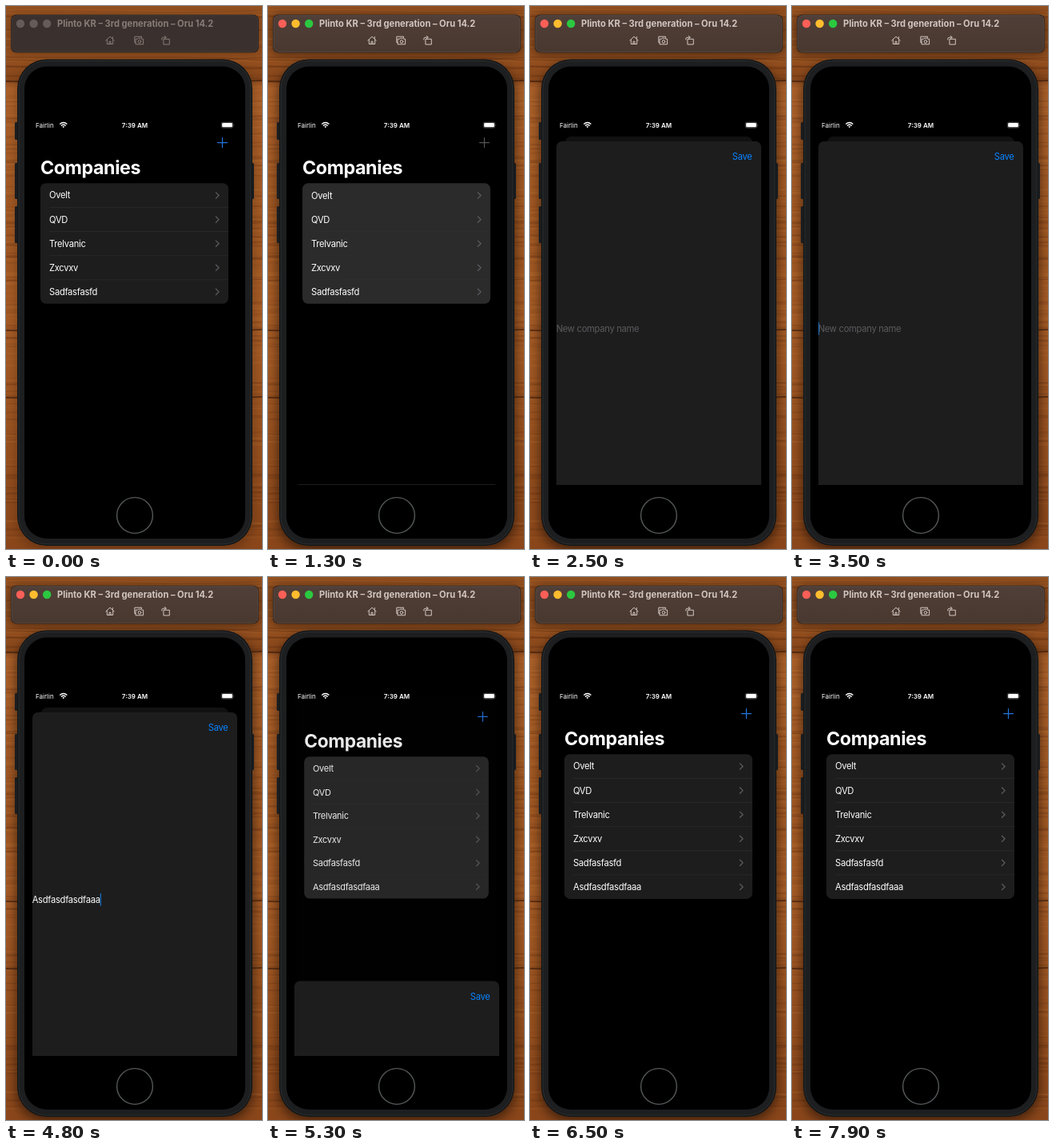
An HTML page for the animation above (8 s loop, 320 by 678 pixels).

```html
<!DOCTYPE html>
<html lang="en">
<head>
<meta charset="utf-8">
<title>Company list</title>
<style>
html, body { margin: 0; width: 100%; height: 100%; overflow: hidden; background: #6f3b19; }
svg { display: block; width: 320px; height: 678px; }
text { font-family: Inter, "Open Sans", sans-serif; fill: #fff; white-space: pre; }
.body { font-size: 11.2px; letter-spacing: -.29px; }
.status { font-size: 8px; }
.line { fill: none; stroke-linecap: round; stroke-linejoin: round; }
</style>
</head>
<body>
<svg viewBox="0 0 320 678">
  <defs>
    <linearGradient id="wood" x2="0" y2="1">
      <stop offset="0" stop-color="#94501f"/>
      <stop offset=".1" stop-color="#95501f"/>
      <stop offset=".135" stop-color="#85451a"/>
      <stop offset=".15" stop-color="#ac6029"/>
      <stop offset=".4" stop-color="#a05722"/>
      <stop offset=".6" stop-color="#a65b25"/>
      <stop offset=".8" stop-color="#98511f"/>
      <stop offset="1" stop-color="#8a461a"/>
    </linearGradient>
    <linearGradient id="bar" x2="0" y2="1">
      <stop offset="0" stop-color="#503f38"/>
      <stop offset="1" stop-color="#48382f"/>
    </linearGradient>
    <filter id="blur" x="-20%" y="-40%" width="140%" height="180%"><feGaussianBlur stdDeviation="7"/></filter>
    <clipPath id="screen"><rect x="33" y="143" width="256" height="455"/></clipPath>
  </defs>

  <rect width="320" height="678" fill="url(#wood)"/>
  <g id="grain" class="line"></g>
  <g id="shadow" filter="url(#blur)">
    <rect x="12" y="72" width="298" height="608" rx="38"/>
    <rect x="5" y="12" width="312" height="48" rx="8"/>
  </g>

  <!-- phone -->
  <g fill="#1b1d1f">
    <rect x="11" y="145" width="5" height="22" rx="1.5"/>
    <rect x="11" y="196" width="5" height="45" rx="1.5"/>
    <rect x="11" y="250" width="5" height="46" rx="1.5"/>
    <rect x="306" y="196" width="4" height="45" rx="1.5"/>
  </g>
  <rect x="14" y="66.5" width="294" height="607.5" rx="37" fill="#141617"/>
  <rect x="16" y="68.5" width="290" height="603.5" rx="35" fill="#1c1e20" stroke="#2b2e30"/>
  <rect x="23" y="75.5" width="276" height="589.5" rx="28"/>
  <circle cx="161" cy="636" r="22.4" fill="none" stroke="#55585a" stroke-width="1.4"/>

  <!-- simulator title bar -->
  <rect x="6" y="10.8" width="310" height="47.4" rx="7" fill="#17110e"/>
  <rect id="barFace" x="6.9" y="11.7" width="308.2" height="45.6" rx="6.2" stroke-width=".7"/>
  <g id="lights"></g>
  <text id="barTitle" x="64" y="26" font-size="11.1" font-weight="700">Plinto KR – 3rd generation – Oru 14.2</text>
  <g id="tools" class="line" stroke-width="1">
    <path d="M124.8 43 130 38.2 135.2 43M126.3 42.5V47.5H133.7V42.5M129 47.5V44.3H131V47.5M133.3 40.5V38.5"/>
    <path d="M162 45.5H160.8V38.2H169.5V39.8M162.4 41.2H164.6L165.4 40.2H168.6L169.4 41.2H171.6V47.8H162.4Z"/>
    <circle cx="167" cy="44.4" r="1.8"/>
    <path d="M197.3 41.3H204.3V48H197.3ZM194.8 42V41Q194.8 39.2 197 39.2H200M198.3 37.4 200.2 39.2 198.3 41"/>
  </g>

  <!-- app -->
  <g clip-path="url(#screen)">
    <g id="page">
      <rect id="card" x="33" y="143" width="256" height="455" rx="8"/>
      <path id="plus" class="line" d="M264.5 170.5H276.5M270.5 164.5V176.5" stroke-width="1.25"/>
      <text x="43" y="210.3" font-size="23.2" font-weight="700" letter-spacing="-.35">Companies</text>
      <rect id="list" x="43" y="221.3" width="235" rx="7"/>
      <g id="rows"></g>
      <rect id="dim" x="32" y="142" width="258" height="457"/>
    </g>
    <g id="sheet">
      <rect x="33" width="256" height="470" rx="7" fill="#1d1d1e"/>
      <text id="save" class="body" x="252.8" y="23.4" style="fill:#0a84ff">Save</text>
      <g id="field">
        <text id="entry" class="body" x="32.7"></text>
        <rect id="caret" y="-12" width="1.3" height="15.5" fill="#1b70c4"/>
      </g>
    </g>
  </g>

  <!-- status bar -->
  <text class="status" x="37" y="151.7">Fairlin</text>
  <text class="status" x="161" y="151.7" font-weight="600" text-anchor="middle">7:39 AM</text>
  <g class="line" stroke="#fff" stroke-width="1.35" style="stroke-linecap:butt">
    <path d="M67.2 147.5Q71.8 143.6 76.4 147.5M68.9 149.4Q71.8 147 74.7 149.4"/>
    <path d="M70.4 150.6Q71.8 149.5 73.2 150.6L71.8 152.2Z" fill="#fff" stroke="none"/>
  </g>
  <rect x="269.2" y="145.2" width="14.6" height="6.9" rx="2" fill="none" stroke="#777" stroke-width=".6"/>
  <rect x="270.1" y="146" width="12.8" height="5.3" rx="1.3" fill="#fff"/>
  <path d="M284.6 147.5Q285.8 148.7 284.6 149.9Z" fill="#888"/>
</svg>

<script>
const LOOP = 8;
const OPEN_AT = 1.295, CLOSE_AT = 5.061;
const FOCUS_AT = 3, TYPE_AT = 3.85, TYPE_END = 4.6;
const ROW_HEIGHT = 30.1;
const TYPED = "Asdfasdfasdfaaa";
const companies = ["Ovelt", "QVD", "Trelvanic", "Zxcvxv", "Sadfasfasfd", TYPED];

const $ = id => document.getElementById(id);
const clamp = x => Math.min(1, Math.max(0, x));

function add(parent, tag, attrs, text = "") {
  const node = document.createElementNS("http://www.w3.org/2000/svg", tag);
  for (const key in attrs) node.setAttribute(key, attrs[key]);
  node.textContent = text;
  parent.append(node);
  return node;
}

function drawGrain() {
  let seed = 11;
  const random = () => (seed = seed * 16807 % 2147483647) / 2147483647;
  for (let i = 0; i < 180; i++) {
    const y = random() * 678, bend = () => y + random() * 10 - 5;
    add($("grain"), "path", {
      d: `M-5 ${y}C80 ${bend()} 220 ${bend()} 325 ${bend()}`,
      stroke: random() < .55 ? "#4a210a" : "#c47a39",
      "stroke-width": .5 + random() * 2.2,
      opacity: .06 + random() * .18
    });
  }
  for (const y of [94, 405, 489])
    add($("grain"), "path", { d: `M0 ${y}Q160 ${y + 4} 320 ${y - 1}`, stroke: "#2a1206", "stroke-width": 1.8, opacity: .55 });
}

const lights = [18, 34.6, 51.2].map(cx => add($("lights"), "circle", { cx, cy: 22, r: 5.2 }));

const rows = companies.map((name, i) => {
  const row = add($("rows"), "g", { transform: `translate(0 ${221.3 + i * ROW_HEIGHT})` });
  if (i) add(row, "path", { d: "M54 0H278", stroke: "#303032", "stroke-width": .6 });
  add(row, "text", { class: "body", x: 54, y: 19.2 }, name);
  add(row, "path", { class: "line", d: "M262.4 11.6 266.1 15.2 262.4 18.8", stroke: "#5c5c60", "stroke-width": 1.3 });
  return row;
});

// Critically damped spring from 0 to 1.
function spring(t) {
  const x = 12 * Math.max(0, t);
  return 1 - (1 + x) * Math.exp(-x);
}

// An active window has coloured controls and a heavier shadow.
function drawWindow(active) {
  const colors = active ? ["#fb5f57", "#febc2e", "#2bc840"] : Array(3).fill("#655b58");
  const ink = active ? "#d2c6c0" : "#887c77";
  lights.forEach((light, i) => light.setAttribute("fill", colors[i]));
  $("barTitle").style.fill = ink;
  $("tools").setAttribute("stroke", ink);
  $("barFace").setAttribute("fill", active ? "url(#bar)" : "#3a302d");
  $("barFace").setAttribute("stroke", active ? "#6b5b53" : "#534844");
  $("shadow").setAttribute("opacity", active ? .5 : .22);
}

function drawPage(p, closing) {
  const scale = 1 - .086 * p;
  const raised = p > .002;
  const count = closing ? 6 : 5;
  const level = 27 * p * p;
  $("page").setAttribute("transform", `translate(161 ${143 + 20 * p}) scale(${scale}) translate(-161 -143)`);
  $("card").setAttribute("fill", `rgb(${level},${level},${level})`);
  $("plus").setAttribute("stroke", raised && !closing ? "#545456" : "#2474dc");
  $("list").setAttribute("height", count * ROW_HEIGHT);
  $("list").setAttribute("fill", raised ? "#2b2b2c" : "#1d1d1e");
  rows[5].setAttribute("visibility", closing ? "visible" : "hidden");
  $("dim").setAttribute("opacity", .39 * p);
}

function drawSheet(p, t) {
  $("sheet").setAttribute("transform", `translate(0 ${598 - 429 * p})`);
  $("field").setAttribute("transform", `translate(0 ${238 + 24 * (1 - p)})`);
  const typed = TYPED.slice(0, Math.ceil(clamp((t - TYPE_AT) / (TYPE_END - TYPE_AT)) * TYPED.length));
  const entry = $("entry");
  entry.textContent = typed || "New company name";
  entry.style.fill = typed ? "#fff" : "#5b5b5e";
  $("caret").setAttribute("visibility", t >= FOCUS_AT && t < CLOSE_AT ? "visible" : "hidden");
  $("caret").setAttribute("x", 32.7 + (typed ? entry.getComputedTextLength() : 0));
}

function draw(now) {
  const t = now / 1000 % LOOP;
  const closing = t >= CLOSE_AT;
  const p = closing ? 1 - spring(t - CLOSE_AT) : spring(t - OPEN_AT);
  drawWindow(t >= .1);
  drawPage(p, closing);
  drawSheet(p, t);
  requestAnimationFrame(draw);
}

drawGrain();
draw(0);
</script>
</body>
</html>
```
